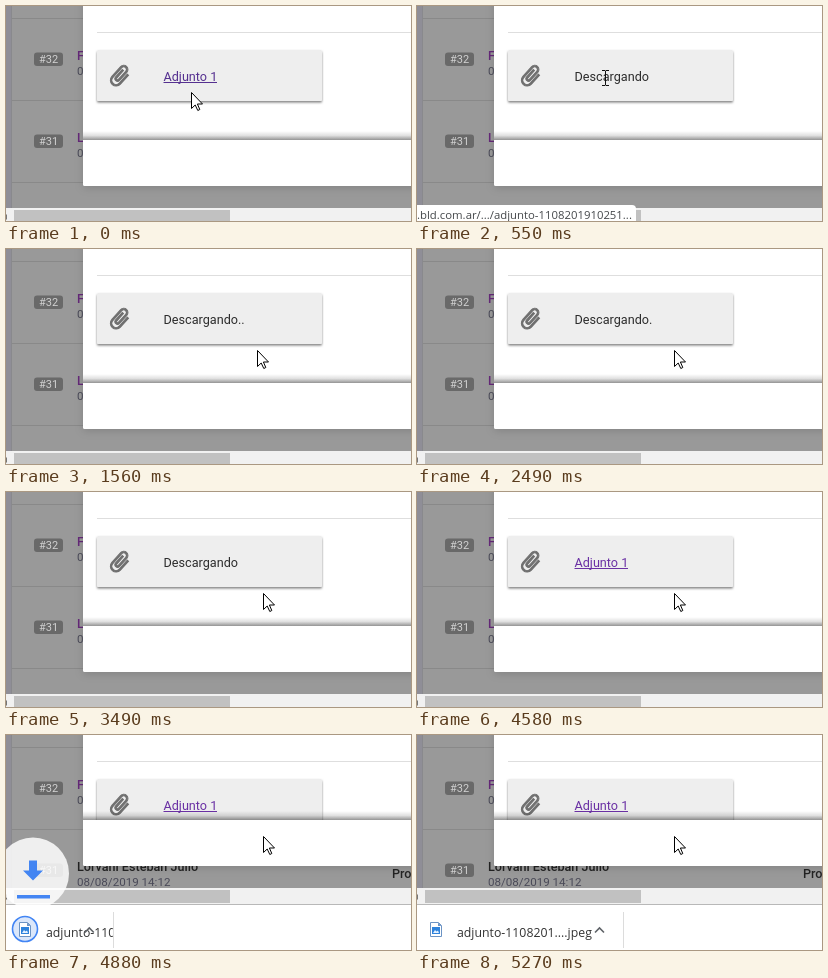
An HTML page that plays this animation: 405x215 px, repeating every 5.34 s.

```html
<!DOCTYPE html>
<html lang="es">
<head>
<meta charset="utf-8">
<title>Descarga de adjunto</title>
<style>
html, body { margin: 0; width: 100%; height: 100%; overflow: hidden; background: #999; }
svg { display: block; width: 405px; height: 215px; }
text { font-family: Roboto, Arial, sans-serif; white-space: pre; }
.ui { font-family: "Open Sans", "Noto Sans", sans-serif; }
.name { font-size: 12.6px; font-weight: 500; }
.date { font-size: 11.6px; }
</style>
</head>
<body>
<svg viewBox="0 0 405 215">
  <defs>
    <filter id="modalShadow" x="-20%" y="-20%" width="140%" height="150%">
      <feDropShadow dx="0" dy="2" stdDeviation="4" flood-opacity=".14"/>
    </filter>
    <filter id="cardShadow" x="-5%" y="-20%" width="110%" height="150%">
      <feDropShadow dx="0" dy="1.5" stdDeviation="1.3" flood-opacity=".5"/>
    </filter>
    <linearGradient id="upFade" x1="0" y1="0" x2="0" y2="1">
      <stop offset="0" stop-color="#000" stop-opacity="0"/>
      <stop offset=".5" stop-color="#000" stop-opacity=".12"/>
      <stop offset="1" stop-color="#000" stop-opacity=".42"/>
    </linearGradient>
    <clipPath id="itemClip"><rect id="itemBox" y="168" height="47"/></clipPath>
  </defs>

  <rect width="405" height="215" fill="#999"/>
  <rect width="5" height="215" fill="#8f8e97"/>
  <path d="M5.5 0V215" stroke="#89898d"/>
  <path d="M6 12.5H405M6 94.5H405M6 176.5H405" stroke="#898989"/>
  <g id="rows"></g>
  <text x="386" y="143" class="name" fill="#222">Pro</text>

  <rect id="modal" x="77" y="-30" width="360" rx="2" fill="#fff" filter="url(#modalShadow)"/>
  <path d="M91 26.5H405" stroke="#dedede"/>
  <g id="card">
    <rect x="91" y="44" width="225" height="51" rx="1.5" fill="#eee" filter="url(#cardShadow)"/>
    <path transform="translate(114 70) rotate(42) scale(1.05) translate(-12.5 -12)" fill="#6f6f6f" stroke="#6f6f6f"
      d="M16.5 6v11.5c0 2.21-1.79 4-4 4s-4-1.79-4-4V5c0-1.38 1.12-2.5 2.5-2.5s2.5 1.12 2.5 2.5v10.5c0 .55-.45 1-1 1s-1-.45-1-1V6H10v9.5c0 1.38 1.12 2.5 2.5 2.5s2.5-1.12 2.5-2.5V5c0-2.21-1.79-4-4-4S7 2.79 7 5v12.5c0 3.04 2.46 5.5 5.5 5.5s5.5-2.46 5.5-5.5V6z"/>
    <text id="label" x="157.5" y="75" font-size="12.65"></text>
    <path id="underline" d="M157.5 76.5H211"/>
  </g>
  <g id="footer">
    <rect x="77" y="125" width="328" height="9" fill="url(#upFade)"/>
    <rect x="77" y="134" width="340" height="46" rx="2" fill="#fff"/>
    <rect x="77" y="134" width="328" height="4" fill="#fff"/>
  </g>

  <g id="bottom">
    <rect y="202" width="405" height="17" fill="#f1f1f1"/>
    <rect x="8" y="204" width="216" height="13" fill="#c1c1c1"/>
    <path d="M0 208.5h1v5h-1z" fill="#777"/>
    <rect y="219" width="405" height="60" fill="#fff"/>
    <path d="M0 218.5H405" stroke="#b8b8b8"/>
  </g>

  <g id="item">
    <g clip-path="url(#itemClip)">
      <g id="ring">
        <circle cx="19" cy="194" r="12.5" fill="#dbe7fa" stroke="#4285f4" stroke-width="1.6"/>
      </g>
      <path d="M13.5 187.5H21.5L24.5 190.5V201.5H13.5Z" fill="#fff" stroke="#6b93c4"/>
      <path d="M21 187.5V191H24.5Z" fill="#6b93c4"/>
      <rect x="15" y="192" width="8" height="7" fill="#2f83dc"/>
      <path d="M16 198L18 195L19.500 196.500L21 195.500L22 198Z" fill="#e4f1ff"/>
      <text class="ui" x="40" y="201.500" font-size="12.3" fill="#333">adjunto-1108201....jpeg</text>
    </g>
    <path id="chevron" d="M-4.500 197.500L0 193L4.500 197.500" fill="none" stroke="#5f6368" stroke-width="1.6"/>
    <path id="divider" d="M0 177V213" stroke="#dcdcdc"/>
  </g>

  <g id="started">
    <circle cx="27" cy="36" r="36" fill="#fff" fill-opacity=".86"/>
    <path d="M23 23H31V33H37L27 43L17 33H23ZM11 57.500H44V61H11Z" fill="#4285f4"/>
  </g>

  <g id="bubble">
    <path d="M0 199H215Q219 199 219 203V220H0Z" fill="#fff"/>
    <text class="ui" x="0" y="213" font-size="11.35" fill="#45484b">.bld.com.ar/.../adjunto-1108201910251...</text>
  </g>

  <g id="cursor">
    <path id="arrow" d="M.5 .5V16.500L4.200 13L6.800 18.500L8.800 17.500L6.400 12H11.500Z" fill="#fff" stroke="#000"/>
    <path id="hand" fill="#fff" stroke="#000"
      d="M-1.500 1.500Q0 -.5 1.500 1.500V7Q3 5.500 4.500 7.500Q6 6 7.500 8Q9.500 7 10.500 9V14L8.500 18V21.500H-1.500V18.500L-6 12.500Q-6.500 10 -4 10.500L-1.500 13Z"/>
    <path id="beam" d="M-3 -7.500H0L.5 -7L1 -7.500H4M.5 -7V7M-3 7.500H0L.5 7L1 7.500H4" fill="none" stroke="#111"/>
  </g>
</svg>
<script>
const LOOP = 5340, SHELF = 49, ITEM = 206;
const STEPS = [0, 70, 150, 230, 310, 390, 470, 550, 610, 690, 770, 850, 930, 1010,
  1330, 1400, 1480, 1560, 2030, 2340, 2410, 2490, 3030, 3490, 4040, 4500, 4580,
  4730, 4810, 4880, 4960, 5040, 5110, 5190, 5270];
// time, x, y of the pointer's hot spot
const PATH = [[0, 185, 86], [310, 188, 60], [390, 188, 60], [550, 188, 72], [610, 191, 74],
  [1010, 238, 89], [1250, 238, 89], [1560, 251, 101], [2270, 251, 101], [2490, 257, 101], [LOOP, 257, 101]];
// moments at which the dot count advances 0, 1, 2, 0, ...
const DOTS = [550, 1010, 1560, 2030, 2490, 3030, 3490, 4040, 4500];

const $ = id => document.getElementById(id);
const set = (id, name, value) => $(id).setAttribute(name, value);
const show = (id, on) => set(id, "visibility", on ? "visible" : "hidden");
const move = (id, x, y) => set(id, "transform", `translate(${x} ${y})`);
const ramp = (t, start, span) => Math.min(1, Math.max(0, (t - start) / span));
const easeOut = u => 1 - (1 - u) ** 2;

function row(y, tag, name, date) {
  return `<rect x="28" y="${y}" width="29" height="13.500" rx="3" fill="#696969"/>
    <text x="42.500" y="${y + 10}" font-size="11" text-anchor="middle" fill="#d0d0d0">${tag}</text>
    <text id="name${tag.slice(1)}" class="name" x="71" y="${y + 7.5}" fill="#642878">${name}</text>
    <text class="date" x="71" y="${y + 22.5}" fill="#4a4a58">${date}</text>`;
}
$("rows").innerHTML = row(46.5, "#32", "F", "0") + row(128.5, "#31", "Lorvani Esteban Julio", "08/08/2019 14:12");

function pointerAt(t) {
  const i = PATH.findIndex(p => p[0] > t);
  const [a, b] = [PATH[i - 1], PATH[i]];
  const u = ramp(t, a[0], b[0] - a[0]);
  return [1, 2].map(k => Math.round(a[k] + (b[k] - a[k]) * u));
}

function drawPointer(t) {
  move("cursor", ...pointerAt(t));
  const kind = t < 70 ? "arrow" : t < 550 ? "hand" : t < 770 ? "beam" : "arrow";
  for (const id of ["arrow", "hand", "beam"]) show(id, id === kind);
}

function drawLabel(t) {
  const busy = t >= 550 && t < 4580;
  const dots = (DOTS.filter(d => d <= t).length + 2) % 3;
  const color = busy ? "#2c2c2c" : t < 550 ? "#553090" : "#6a30a4";
  $("label").textContent = busy ? "Descargando" + ".".repeat(dots) : "Adjunto 1";
  set("label", "fill", color);
  set("underline", "stroke", color);
  show("underline", !busy);
}

function drawShelf(t) {
  const lift = Math.round(SHELF * ramp(t, 4690, 120));
  for (const id of ["footer", "bottom"]) move(id, 0, -lift);
  set("modal", "height", 210 - lift);
  set("name31", "fill", lift ? "#222" : "#642878");

  const width = ITEM * easeOut(ramp(t, 4730, 490));
  show("item", width > 0);
  set("itemBox", "width", width);
  set("ring", "opacity", 1 - ramp(t, 4880, 390));
  move("chevron", width - 23.5, 0);
  move("divider", Math.round(width) + 0.5, 0);

  const v = easeOut(ramp(t, 4725, 600));
  show("started", t >= 4730 && t < 5270);
  set("started", "opacity", 1 - 4 * (v - 0.5) ** 2);
  move("started", 0, 70 + 72 * v);
}

function draw(time) {
  const now = time % LOOP;
  const t = STEPS.filter(s => s <= now).pop();
  drawPointer(t);
  drawLabel(t);
  drawShelf(t);
  set("bubble", "opacity", ramp(t, 110, 150) * (1 - ramp(t, 700, 200)));
}

const start = performance.now();
function tick() {
  draw(performance.now() - start);
  requestAnimationFrame(tick);
}
tick();
</script>
</body>
</html>
```
